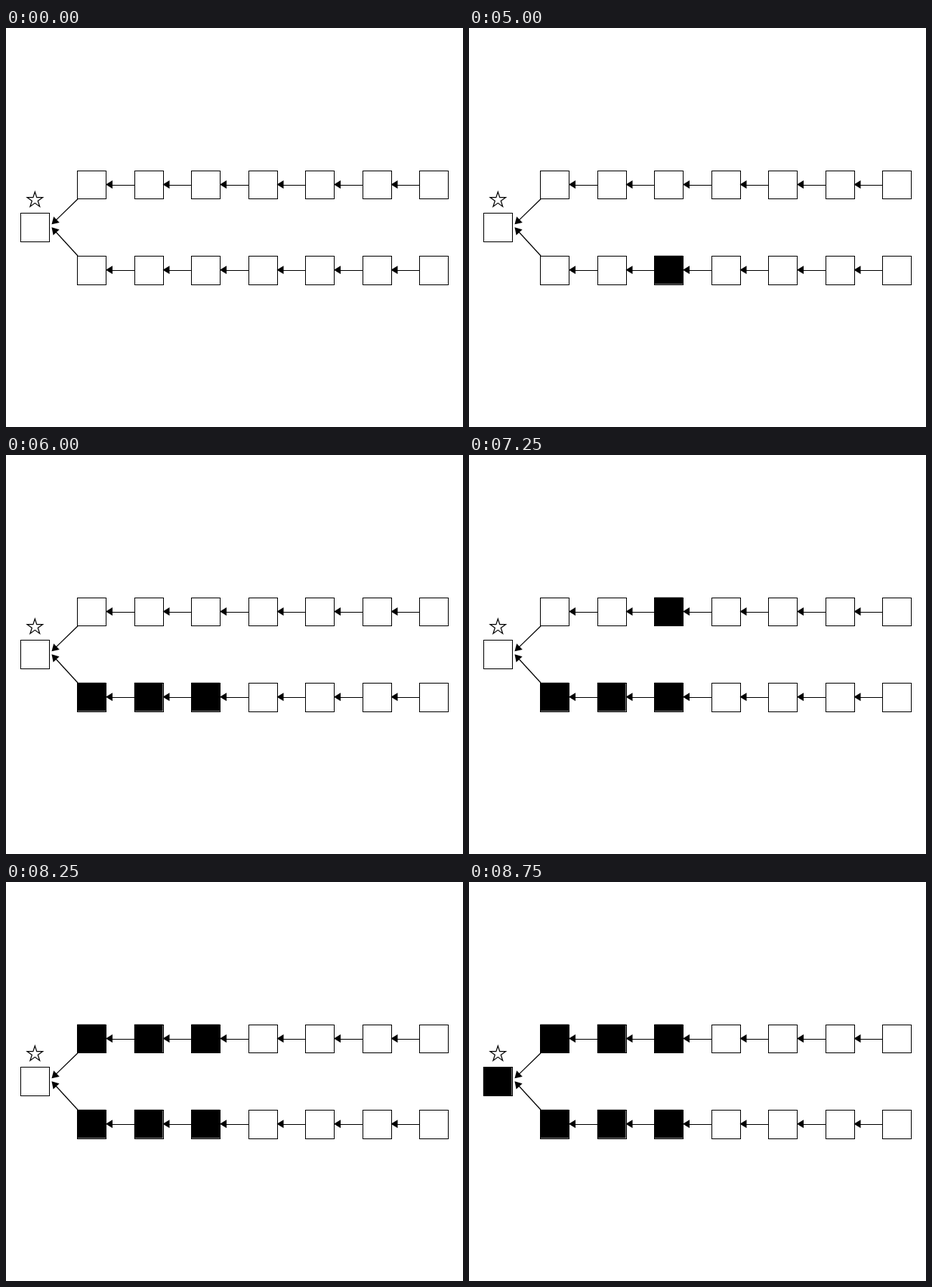
Write an HTML page with a canvas that moves like this. It is 605x529 px and loops after 9.75 s.

```html
<!DOCTYPE html>
<html lang="en">
<head>
<meta charset="utf-8">
<title>Two chains</title>
<style>
  html, body { margin: 0; width: 100%; height: 100%; overflow: hidden; background: #fff; }
  canvas { display: block; }
</style>
</head>
<body>
<canvas id="stage" width="605" height="529"></canvas>
<script>
const ctx = document.getElementById('stage').getContext('2d');
const LOOP = 9750, SIZE = 37.72, STEP = 75.5;
const TOP = 188.7, MIDDLE = 245.3, BOTTOM = 301.8;

const columnX = column => 18.8 + STEP * column;

// Each box turns black at its time: [ms, column, row y]
const fills = [
  [5000, 3, BOTTOM], [5500, 2, BOTTOM], [6000, 1, BOTTOM],
  [7250, 3, TOP], [7750, 2, TOP], [8250, 1, TOP],
  [8750, 0, MIDDLE]
];

function box(column, y) {
  const x = columnX(column);
  const left = Math.round(x), top = Math.round(y);
  const right = Math.round(x + SIZE), bottom = Math.round(y + SIZE);
  ctx.strokeRect(left + 0.5, top + 0.5, right - left, bottom - top);
}

function line(x1, y1, x2, y2) {
  ctx.beginPath();
  ctx.moveTo(x1, y1);
  ctx.lineTo(x2, y2);
  ctx.stroke();
}

function arrowHead(x, y, angle) {
  ctx.save();
  ctx.translate(x, y);
  ctx.rotate(angle);
  ctx.beginPath();
  ctx.moveTo(0, 0);
  ctx.lineTo(-9, -5.5);
  ctx.lineTo(-9, 5.5);
  ctx.fill();
  ctx.restore();
}

function diagonal(x1, y1, x2, y2) {
  const angle = Math.atan2(y2 - y1, x2 - x1);
  line(x1, y1, x2 - 6 * Math.cos(angle), y2 - 6 * Math.sin(angle));
  arrowHead(x2, y2, angle);
}

function star(x, y, radius) {
  ctx.beginPath();
  for (let i = 0; i < 10; i++) {
    const r = i % 2 ? radius * 0.382 : radius;
    const a = i * Math.PI / 5;
    ctx.lineTo(x + r * Math.sin(a), y - r * Math.cos(a));
  }
  ctx.closePath();
  ctx.stroke();
}

function chain(y) {
  for (let column = 1; column <= 7; column++) {
    box(column, y);
    if (column === 7) continue;
    const tip = columnX(column) + SIZE;
    const lineY = Math.round(y + 19) + 0.5;
    line(tip + 6, lineY, Math.round(columnX(column + 1)), lineY);
    arrowHead(tip, y + SIZE / 2, Math.PI);
  }
}

function draw(time) {
  ctx.fillStyle = '#fff';
  ctx.fillRect(0, 0, 605, 529);
  ctx.fillStyle = ctx.strokeStyle = '#000';
  for (const [start, column, y] of fills) {
    if (time >= start) ctx.fillRect(columnX(column), y, SIZE, SIZE);
  }
  ctx.lineWidth = 1;
  box(0, MIDDLE);
  chain(TOP);
  chain(BOTTOM);
  ctx.lineWidth = 1.2;
  diagonal(95, 226.7, 60.5, 260.3);
  diagonal(95, 302, 60.5, 264.3);
  star(38.3, 228, 10.8);
}

const begin = performance.now();
function tick() {
  draw((performance.now() - begin) % LOOP);
  requestAnimationFrame(tick);
}
tick();
</script>
</body>
</html>
```
